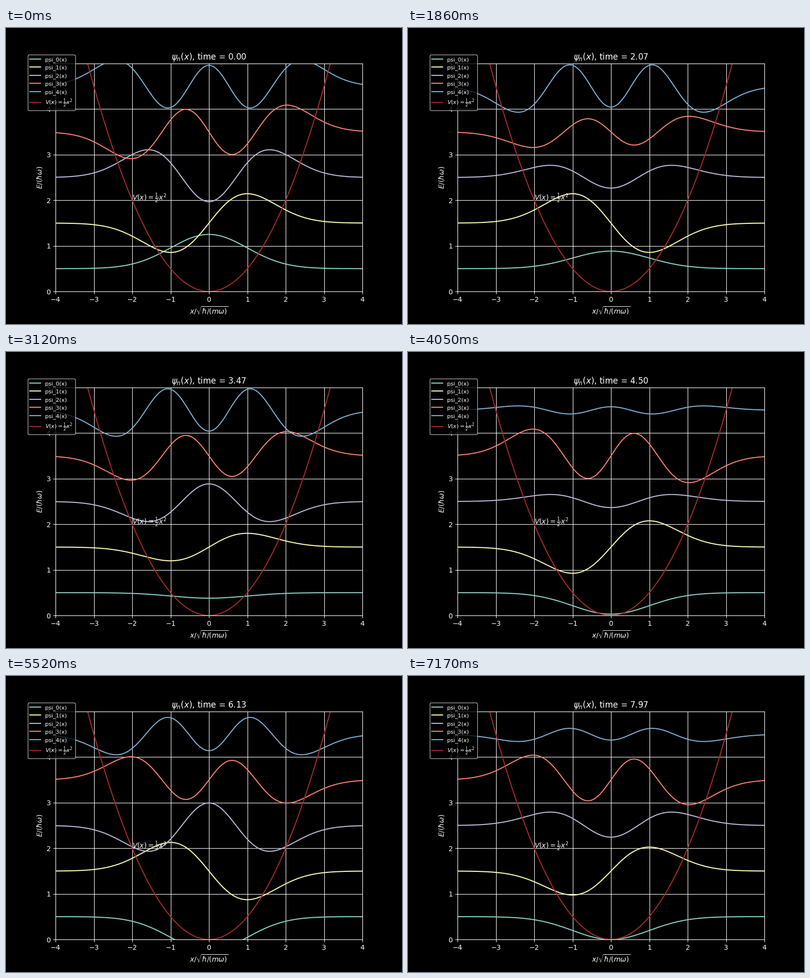
These frames come from a looping animation (800x600 px, 7200 ms). A matplotlib script:

```python
from math import factorial, pi, sqrt

import matplotlib.pyplot as plt
import numpy as np
from matplotlib.animation import FuncAnimation
from numpy.polynomial.hermite import hermval

FRAMES = 240
INTERVAL = 30  # ms
LEVELS = 5
TIME_STEP = 1 / 30
POTENTIAL = r"$V(x)=\frac{1}{2}x^2$"


def eigenstate(n, x):
    """Harmonic oscillator eigenfunction in natural units."""
    norm = 1 / sqrt(2**n * factorial(n) * sqrt(pi))
    return norm * hermval(x, [0] * n + [1]) * np.exp(-x**2 / 2)


def title_text(t):
    return rf"$\psi_n(x)$, time = {t:.2f}"


plt.style.use("dark_background")
fig, ax = plt.subplots(figsize=(8, 6), dpi=100)

x = np.linspace(-4, 4, 201)
states = [eigenstate(n, x) for n in range(LEVELS)]
energies = [n + 0.5 for n in range(LEVELS)]

lines = [
    ax.plot(x, e + psi, label=f"psi_{n}(x)")[0]
    for n, (e, psi) in enumerate(zip(energies, states))
]
ax.plot(x, x**2 / 2, color="brown", label=POTENTIAL)
ax.text(-2, 2, POTENTIAL)

ax.set_xlim(-4, 4)
ax.set_ylim(0, 5)
ax.set_xlabel(r"$x/\sqrt{\hbar/(m\omega)}$")
ax.set_ylabel(r"$E/(\hbar\omega)$")
ax.grid(True)
ax.legend(loc="upper left", bbox_to_anchor=(-0.1, 1.05), fontsize=8)
title = ax.set_title(title_text(0))


def update(frame):
    t = frame * TIME_STEP
    for line, e, psi in zip(lines, energies, states):
        line.set_ydata(e + psi * np.cos(e * t))
    title.set_text(title_text(t))
    return [*lines, title]


anim = FuncAnimation(fig, update, frames=FRAMES, interval=INTERVAL,
                     repeat=True, repeat_delay=0)
plt.show()
```
